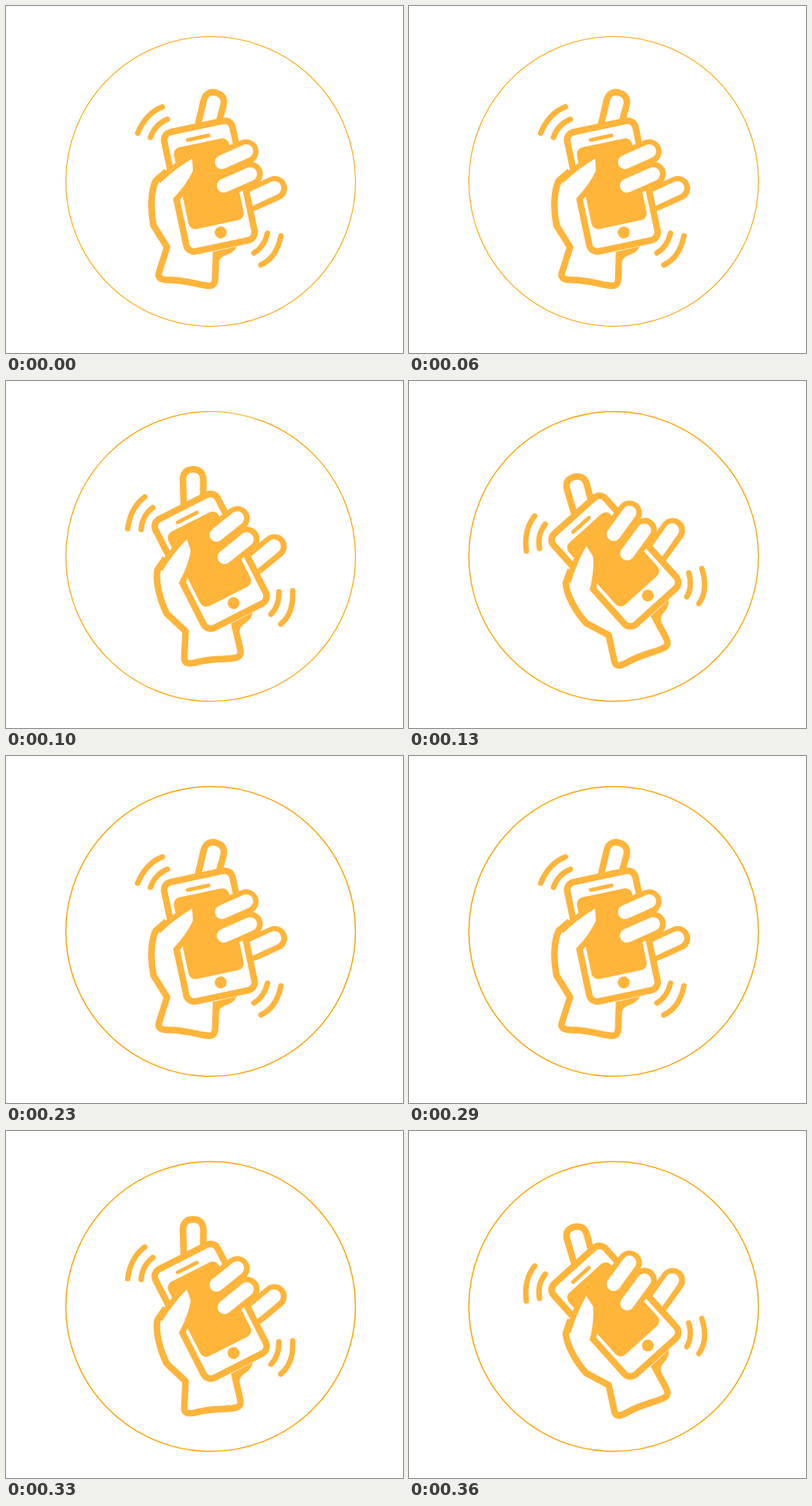
Recreate the animation shown at these times as an HTML page. Size 514 px wide and 449 px high, loop 0.46 s.

```html
<!DOCTYPE html>
<html lang="en">
<head>
<meta charset="utf-8">
<title>Shake the phone</title>
<style>
  html, body { margin: 0; width: 100%; height: 100%; overflow: hidden; background: #fff; }
  svg { display: block; width: 100vw; height: 100vh; }
  .line { fill: none; stroke: #ffb43a; stroke-width: 8.5; stroke-linejoin: round; }
  .skin { fill: #fff; }
  .solid { fill: #ffb43a; }
  .wave { fill: none; stroke: #ffb43a; stroke-width: 7; stroke-linecap: round; }
  .edge { fill: none; stroke: #ffb43a; stroke-width: 32; stroke-linecap: round; }
  .core { fill: none; stroke: #fff; stroke-width: 18; stroke-linecap: round; }
</style>
</head>
<body>
<svg viewBox="0 0 514 449">
  <circle id="ring" cx="265" cy="227" r="187.5" fill="none" stroke="#ffa200"/>
  <g id="icon">
    <path class="wave" d="M170.5 164.5Q181 139 202.5 130.5"/>
    <path class="wave" d="M187 170Q193 153 209 146.5"/>
    <path class="wave" d="M321 319.5Q334 312 338.5 294"/>
    <path class="wave" d="M330 335Q350 326 356 297.5"/>

    <!-- index and little finger behind the phone -->
    <path class="line skin" d="M247.500 158L256 122C259 110 268 111 273 112.500C281 115 283.500 121 281.500 129L274 156"/>
    <path class="edge" d="M318 249.500L348 236"/>
    <path class="core" d="M310 253L347.500 235.500"/>

    <!-- palm and wrist -->
    <path class="line skin" d="M208 214L194 226C187 240 187 265 191 284L208.500 312L198 345C196 352 201 354 209 354.500C235 354 250 362 263 362C270 362 271 357 271 350L272 318"/>
    <path class="solid" d="M268 318L275.500 331Q278 324 286 322Q295 319 299 311Z"/>

    <!-- phone, upright around its own origin -->
    <g transform="translate(265 227) rotate(-12)">
      <rect class="line skin" x="-48" y="-73.300" width="90.300" height="157.800" rx="10.500"/>
      <rect class="solid" x="-39.500" y="-51.600" width="73" height="108" rx="9"/>
      <path class="wave" style="stroke-width:5" d="M-18 -58.700H9.500"/>
      <circle class="solid" cx="-1" cy="67.200" r="7.700"/>
    </g>

    <!-- thumb -->
    <path class="line" style="stroke-width:15" d="M200 229Q218 212 241 198L241.500 213Q234 229 217 249"/>
    <path class="skin" d="M197.500 231Q218 211 241 197.500L242 213Q234 231 216.500 249L213 256L200 262Z"/>

    <!-- gripping fingers -->
    <path class="edge" d="M286 199L311 188.500M290 228.500L316.500 217.500"/>
    <path class="core" d="M279.500 202L311 188M282 232.500L316 217.500"/>
  </g>
</svg>
<script>
  const ring = document.getElementById("ring");
  const icon = document.getElementById("icon");
  const LOOP = 460, HALF = 230;
  const STEP = 15;

  // Each half loop holds three poses, 15 degrees apart.
  function poseAt(t) {
    return t < 100 ? 0 : t < 130 ? 1 : 2;
  }

  function draw(ms) {
    const t = ms % LOOP;
    const pose = poseAt(t % HALF);
    const step = pose + (t < HALF ? 0 : 3);
    icon.setAttribute("transform", `rotate(${-STEP * pose} 265 227)`);
    ring.setAttribute("stroke-width", Math.min(1.1 + step * 0.13, 1.5));
  }

  const start = performance.now();
  function tick() {
    draw(performance.now() - start);
    requestAnimationFrame(tick);
  }
  tick();
</script>
</body>
</html>
```
